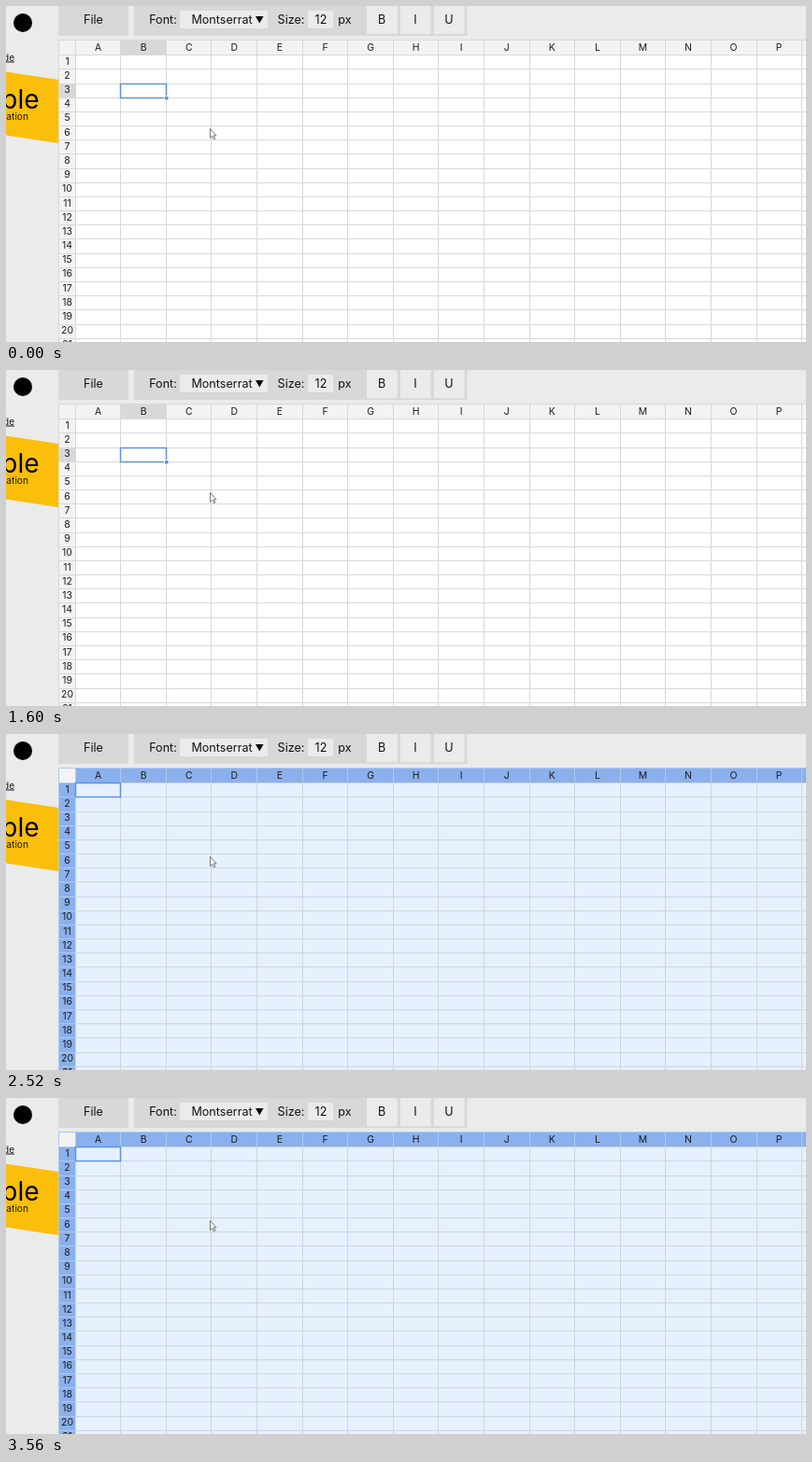
Write an HTML page that moves like this. It is 856 by 360 pixels and loops after 3.6 s.

```html
<!DOCTYPE html>
<html lang="en">
<head>
<meta charset="utf-8">
<title>Select all cells</title>
<style>
  html, body { margin: 0; width: 100%; height: 100%; overflow: hidden; background: #ebebeb; }
  svg { display: block; width: 856px; height: 360px; font-family: Inter, "Open Sans", sans-serif; fill: #1b1b1b; }
  .bar { fill: #d8d8d8; }
  .field { fill: #ebebeb; }
  .tool { font-size: 12.6px; text-anchor: middle; fill: #111; }
  .label { font-size: 10.4px; text-anchor: middle; }
  .box { fill: none; stroke: #5b93e0; stroke-width: 1.5; }
  .all { animation: select 3600ms step-end infinite; }
  @keyframes select {
    0% { opacity: 0; }
    45.5555%, 100% { opacity: 1; }
  }
</style>
</head>
<body>
<svg viewBox="0 0 856 360">
  <rect width="856" height="360" fill="#ebebeb"/>

  <g id="side">
    <circle cx="18" cy="18" r="10" fill="#000"/>
    <text x="9" y="58.5" font-size="10" text-anchor="end" text-decoration="underline">Guide</text>
    <path d="M0 70.5L56 79V147L0 138.5Z" fill="#fabe0b"/>
    <text x="35.5" y="110" font-size="28" text-anchor="end" fill="#000">ple</text>
    <text x="24" y="122" font-size="10.2" text-anchor="end">ation</text>
  </g>

  <g id="toolbar">
    <path class="bar" d="M56 0H131V32H56ZM137 0H493.5V32H137Z"/>
    <path class="field" d="M186 5H280V24H186ZM323 5H350V24H323ZM386 0H418.5V30H386ZM422 0H454.5V30H422ZM458 0H490.5V30H458Z"/>
    <path d="M267 11H275.5L271.2 18.5Z" fill="#000"/>
  </g>

  <g id="idle"></g>
  <g id="all" class="all"></g>

  <path d="M218.5 131.5V141.5L220.8 139.4L222.4 142.8L223.8 142L222.3 138.8H225Z" fill="#fff" stroke="#555" stroke-width=".8"/>
</svg>
<script>
  const NS = 'http://www.w3.org/2000/svg';
  const get = id => document.getElementById(id);
  const colX = i => Math.floor(74 + 48.6 * i);
  const rowY = i => Math.floor(52.65 + 15.18 * i);
  const COLS = 17, ROWS = 21;

  function add(parent, tag, attrs, text) {
    const el = document.createElementNS(NS, tag);
    for (const key in attrs) el.setAttribute(key, attrs[key]);
    if (text) el.textContent = text;
    parent.append(el);
  }

  const rect = (g, x, y, r, b, fill) =>
    add(g, 'rect', { x, y, width: r - x, height: b - y, fill });

  function lines(g, x, y, stroke) {
    let d = '';
    for (let i = 0; i < COLS; i++) d += `M${colX(i) + .5} ${y}V${y === 37 ? 52 : 360}`;
    for (let i = 0; i < ROWS; i++) d += `M${x} ${rowY(i) + .5}H${x === 57 ? 74 : 856}`;
    add(g, 'path', { d, stroke, fill: 'none' });
  }

  function sheet(g, cell, grid, head, headGrid, col, row, marked) {
    rect(g, 56, 36, 856, 360, headGrid);
    rect(g, 57, 37, 856, 360, head);
    rect(g, 74, 52, 856, 360, cell);
    if (marked) {
      rect(g, colX(col), 37, colX(col + 1), 52, '#d8d8d8');
      rect(g, 57, rowY(row), 74, rowY(row + 1), '#d8d8d8');
    } else {
      rect(g, 57, 37, 74, 52, '#f3f3f3');
    }
    lines(g, 74, 52, grid);
    lines(g, 57, 37, headGrid);

    for (let i = 0; i < COLS - 1; i++)
      add(g, 'text', { class: 'label', x: 98.6 + 48.57 * i, y: 48 }, String.fromCharCode(65 + i));
    for (let i = 0; i < ROWS; i++)
      add(g, 'text', { class: 'label', x: 65.5, y: 62.7 + 15.18 * i }, String(i + 1));

    const x = colX(col) + .5, y = rowY(row) + .5;
    const right = colX(col + 1) + .5, bottom = rowY(row + 1) + .5;
    add(g, 'rect', { class: 'box', x, y, width: right - x, height: bottom - y });
    if (marked) {
      rect(g, right - 2.5, bottom - 2.5, right + 2.5, bottom + 2.5, '#fff');
      rect(g, right - 1.5, bottom - 1.5, right + 2, bottom + 2, '#5b93e0');
    }
  }

  const tools = [['File', 93.5], ['Font:', 168], ['Montserrat', 231], ['Size:', 305],
    ['12', 337], ['px', 362.5], ['B', 402], ['I', 438], ['U', 474]];
  for (const [name, x] of tools)
    add(get('toolbar'), 'text', { class: 'tool', x, y: 19 }, name);

  sheet(get('idle'), '#fff', '#d8d8d8', '#f3f3f3', '#d8d8d8', 1, 2, true);
  sheet(get('all'), '#e6f0ff', '#cfd5de', '#8ab0ed', '#afc8ee', 0, 0, false);
</script>
</body>
</html>
```
